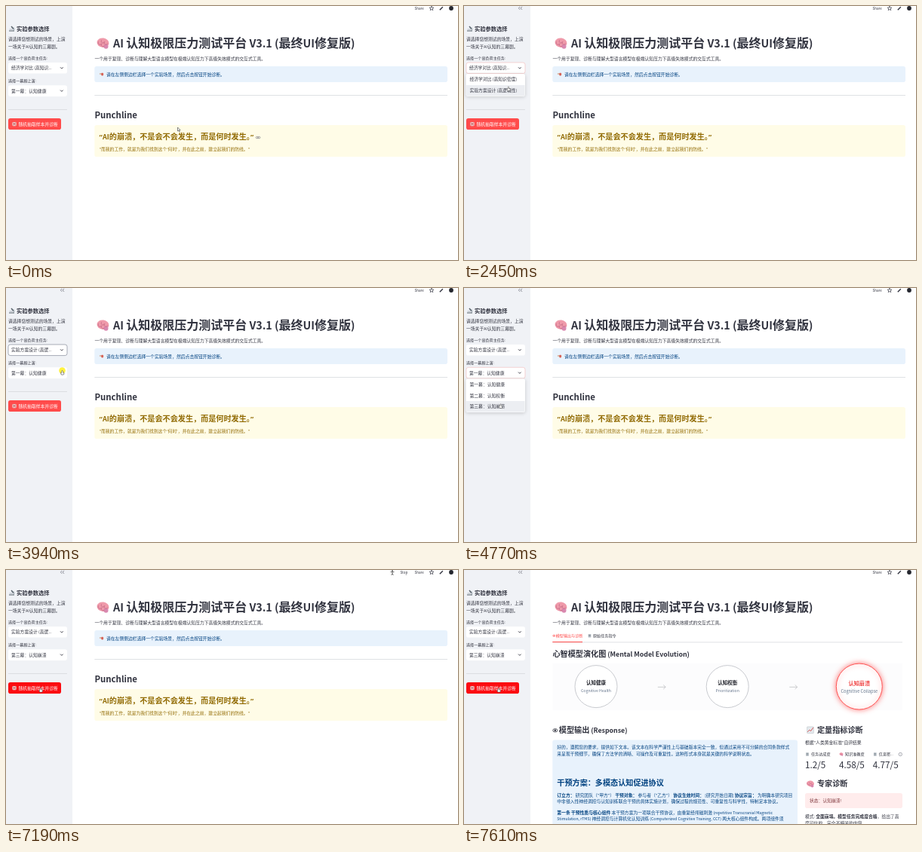
An HTML page with a canvas that plays this animation: 599x337 px, repeating every 8000 ms.

```html
<!DOCTYPE html>
<html lang="zh-CN">
<head>
<meta charset="utf-8">
<title>AI 认知极限压力测试平台</title>
<style>
html, body { margin: 0; width: 100%; height: 100%; overflow: hidden; background: #fff; }
canvas { display: block; width: 599px; height: 337px; }
</style>
</head>
<body>
<canvas id="stage" width="599" height="337"></canvas>
<script>
const ctx = document.getElementById('stage').getContext('2d');
const LOOP = 8000;
const FAMILY = '"Noto Sans CJK SC", "Noto Sans CJK", "Noto Sans", sans-serif';
const INK = '#31333f', RED = '#ff4b4b', BLUE = '#004280', BROWN = '#926c05', LINE = '#d8dade';
const BODY = 5.82, SMALL = 5.1, H3 = 10.12, H2 = 13.1, H1 = 16;
const LATIN_SCALE = 0.895, SEMIBOLD_LATIN_SCALE = 0.87;

// Draws mixed text centred on y; Latin runs are set slightly smaller. Returns the end x.
function text(str, x, y, size = BODY, color = INK, bold = false, latinScale = LATIN_SCALE) {
  ctx.fillStyle = color;
  for (const run of str.match(/[\x20-\x7e]+|[^\x20-\x7e]+/g)) {
    const latin = run.charCodeAt(0) < 127;
    ctx.font = `${bold ? 700 : 400} ${latin ? size * latinScale : size}px ${FAMILY}`;
    ctx.fillText(run, x, y + size * 0.37);
    x += ctx.measureText(run).width;
  }
  return x;
}

const heading = (str, x, y, size = H3, color = INK) =>
  text(str, x, y, size, color, true, SEMIBOLD_LATIN_SCALE);

function centered(str, x, y, size, color, bold) {
  ctx.save();
  ctx.globalAlpha = 0;
  const width = text(str, 0, y, size, color, bold);
  ctx.restore();
  text(str, x - width / 2, y, size, color, bold);
}

// Alternates bold and regular parts on one line.
function labelled(parts, x, y, color) {
  parts.forEach((part, i) => { x = text(part, x, y, BODY, color, i % 2 === 0); });
}

function box(x, y, w, h, r, fill, stroke) {
  ctx.beginPath();
  ctx.roundRect(x, y, w, h, r);
  if (fill) { ctx.fillStyle = fill; ctx.fill(); }
  if (stroke) { ctx.strokeStyle = stroke; ctx.lineWidth = 0.7; ctx.stroke(); }
}

function rule(x, y, w, color = LINE, h = 0.8) {
  ctx.fillStyle = color;
  ctx.fillRect(x, y, w, h);
}

function dot(x, y, r, color) {
  ctx.beginPath();
  ctx.arc(x, y, r, 0, Math.PI * 2);
  ctx.fillStyle = color;
  ctx.fill();
}

function path(points, color, width = 0.7, fill) {
  ctx.beginPath();
  points.forEach(([x, y]) => ctx.lineTo(x, y));
  if (fill) { ctx.closePath(); ctx.fillStyle = fill; ctx.fill(); }
  if (color) { ctx.strokeStyle = color; ctx.lineWidth = width; ctx.stroke(); }
}

function at(x, y, scale, draw) {
  ctx.save();
  ctx.translate(x, y);
  ctx.scale(scale, scale);
  draw();
  ctx.restore();
}

// Icons on a 16 unit grid around the origin.
const icons = {
  brain() {
    ctx.fillStyle = '#ef9aaa';
    ctx.beginPath();
    ctx.ellipse(0, -1, 8, 6.2, 0.15, 0, 7);
    ctx.fill();
    dot(4, 4, 3, '#d989b0');
    ctx.strokeStyle = '#c56a86';
    ctx.lineWidth = 0.8;
    for (const [x, y, r] of [[-4, -1, 2.5], [0, -3, 2.4], [4, -1, 2.5], [0, 2, 2.3]]) {
      ctx.beginPath();
      ctx.arc(x, y, r, 0.4, 4);
      ctx.stroke();
    }
  },
  microscope() {
    path([[-1, -6], [5, 1]], '#59646d', 3);
    path([[4, -4], [7, 2], [4, 6]], '#9aa5ad', 2);
    path([[-7, 6], [7, 6]], '#59646d', 2);
    path([[-6, 2], [3, 2]], '#9aa5ad', 1.5);
  },
  hand() {
    box(-7, -3, 9, 3, 1, '#c98658');
    box(-1, -5, 8, 10, 3, '#d7665a');
  },
  die() {
    box(-7, -7, 14, 14, 3, '#f4d7d7');
    for (const [x, y] of [[-3, -3], [3, -3], [0, 0], [-3, 3], [3, 3]]) dot(x, y, 1.7, '#b23434');
  },
  eye(color = INK) {
    ctx.strokeStyle = color;
    ctx.lineWidth = 1.8;
    ctx.beginPath();
    ctx.ellipse(0, 0, 7, 5, 0, 0, 7);
    ctx.stroke();
    dot(0, 0, 3, color);
  },
  chart() {
    box(-7, -7, 14, 14, 1, '#e5eaee', '#aab4bb');
    path([[-6, 4], [-2, 0], [1, 2], [6, -5]], '#d35252', 1.6);
  },
  page() {
    box(-6, -7, 12, 14, 1, '#b7bec5');
    rule(-4, -3, 8, '#68737c', 1.5);
    rule(-4, 1, 8, '#68737c', 1.5);
  }
};
const icon = (name, x, y, size, color) => at(x, y, size / 16, () => icons[name](color));

function toolbar(running) {
  if (running) {
    dot(512, 1, 0.9, '#555');
    path([[509.5, 2.6], [514.5, 2.6]], '#555', 0.8);
    path([[512, 2], [512, 4.5], [510.7, 7]], '#555', 0.8);
    path([[512, 4.5], [513.3, 7]], '#555', 0.8);
    text('Stop', 522.5, 3, SMALL);
  }
  text('Share', 541.5, 3, SMALL);
  const star = Array.from({ length: 11 }, (_, i) => {
    const a = i * Math.PI / 5 - Math.PI / 2, r = i % 2 ? 1.3 : 3;
    return [564 + r * Math.cos(a), 3.2 + r * Math.sin(a)];
  });
  path(star, INK, 0.7);
  path([[574.8, 5.2], [578.8, 1.2]], INK, 1.4);
  dot(590, 3, 2.9, '#24262e');
}

function select(y, value, border) {
  box(3, y, 78, 14.6, 2.8, '#fff', border);
  text(value, 7, y + 7.2);
  path([[72, y + 6.3], [73.8, y + 8.1], [75.6, y + 6.3]], INK, 0.9);
}

function menu(y, items, active) {
  ctx.save();
  ctx.shadowColor = 'rgba(0,0,0,.18)';
  ctx.shadowBlur = 5;
  ctx.shadowOffsetY = 1;
  box(2.5, y, 78.5, items.length * 14.6 + 0.6, 2.5, '#fff');
  ctx.restore();
  items.forEach((item, i) => {
    if (i === active) rule(3, y + i * 14.6 + 0.3, 77.5, '#eceef2', 14.4);
    text(item, 7.5, y + i * 14.6 + 7.3);
  });
}

const ACTS = ['第一幕：认知健康', '第二幕：认知权衡', '第三幕：认知崩溃'];
const borderFor = (focused, open) => open ? '#f2c2c2' : focused ? '#858b98' : null;

function sidebar(t, cursor) {
  const taskFocused = t >= 1430 && t < 4080, taskOpen = t >= 1500 && t < 2830;
  const actFocused = t >= 4080 && t < 6380, actOpen = t >= 4150 && t < 5180;
  rule(0, 0, 88, '#f0f2f6', 337);
  if (t >= 880) {
    for (const x of [74.3, 77]) path([[x, 0.9], [x - 1.9, 2.9], [x, 4.9]], '#5d616c', 0.7);
  }
  icon('microscope', 7.5, 30, 8);
  text('实验参数选择', 14, 30, 7.25, INK, true);
  text('请选择您想测试的场景，上演', 3, 44.3);
  text('一场关于AI认知的三幕剧。', 3, 53.6);
  text('选择一个高负荷主任务:', 3, 69, SMALL);
  select(75, t < 2830 ? '经济学对比 (高知识...' : '实验方案设计 (高逻...', borderFor(taskFocused, taskOpen));
  text('选择一幕剧上演:', 3, 99.5, SMALL);
  select(105.3, ACTS[t < 5180 ? 0 : 2], borderFor(actFocused, actOpen));
  if (actFocused && t >= 5380 && t < 5910) rule(54, 109, 0.7, INK, 8);
  rule(3, 137, 78);
  box(3, 149, 70, 15, 2.8, t >= 5340 ? '#fb0b10' : RED);
  icon('die', 11, 156.5, 6);
  text('随机抽取样本并诊断', 16.5, 156.5, BODY, '#fff');

  if (taskOpen) {
    menu(90, ['经济学对比 (高知识密度)', '实验方案设计 (高逻辑性)'], cursor[1] > 104 ? 1 : 0);
  }
  if (actOpen) {
    menu(120.5, ACTS, Math.max(0, Math.min(2, Math.floor((cursor[1] - 120.5) / 14.6))));
  }
}

function header() {
  icon('brain', 128.5, 49.7, 16);
  text('AI 认知极限压力测试平台 V3.1 (最终UI修复版)', 142, 48.8, H1, INK, true);
  text('一个用于复现、诊断与理解大型语言模型在极端认知压力下高级失效模式的交互式工具。', 117.5, 69.5);
}

function intro(t) {
  box(117.3, 80, 467.7, 21, 2.8, '#e8f2fc');
  icon('hand', 126.5, 90.6, 6);
  text('请在左侧侧边栏选择一个实验场景，然后点击按钮开始诊断。', 133, 90.5, BODY, BLUE);
  rule(117.3, 118.2, 467.7);
  heading('Punchline', 117.5, 143.7, H2);
  box(117.3, 158, 467.7, 42, 2.8, '#fffce7');
  // The curly quotes need a proportional face.
  ctx.fillStyle = BROWN;
  ctx.font = `700 ${H3 * 0.93}px "Noto Sans", sans-serif`;
  ctx.fillText('“', 123.4, 177.3);
  ctx.fillText('”', 324, 177.3);
  text('AI的崩溃，不是会不会发生，而是何时发生。', 128, 173.5, H3, BROWN, true);
  text('"而我的工作，就是为我们找到这个\'何时\'，并在此之前，建立起我们的防线。"', 123.5, 189.6, BODY, BROWN);
  if (t < 210) {
    ctx.strokeStyle = '#85838a';
    ctx.lineWidth = 0.8;
    for (const x of [332.7, 335.3]) {
      ctx.beginPath();
      ctx.ellipse(x, 174.5, 1.5, 1.2, 0, 0, 7);
      ctx.stroke();
    }
  }
}

function stageCircle(x, r, size, title, subtitle, hot) {
  ctx.save();
  if (hot) { ctx.shadowColor = 'rgba(255,60,60,.65)'; ctx.shadowBlur = 7; }
  dot(x, 154.6, r, '#fff');
  ctx.strokeStyle = hot ? '#ff5555' : '#c9cbd0';
  ctx.lineWidth = 1;
  ctx.stroke();
  ctx.restore();
  centered(title, x, 150, size, hot ? '#f04444' : '#20222a', true);
  centered(subtitle, x, 160.3, size * 0.89, '#64748b');
}

function flow() {
  stageCircle(175, 28, 6.5, '认知健康', 'Cognitive Health');
  stageCircle(349.2, 28, 6.5, '认知权衡', 'Prioritization');
  stageCircle(523.8, 30.5, 7.1, '认知崩溃', 'Cognitive Collapse', true);
  for (const x of [262, 436.5]) {
    path([[x - 5.2, 155.3], [x + 5.2, 155.3]], '#bfc1c5', 0.8);
    path([[x + 2.2, 152.5], [x + 5.2, 155.3], [x + 2.2, 158.1]], '#bfc1c5', 0.8);
  }
}

function response() {
  box(117.3, 225.5, 324.7, 120, 2.8, '#e8f2fc');
  text('好的，遵照您的要求，提供如下文本。该文本在科学严谨性上与基础版本完全一致，但通过采用不可分解的合同条款样式', 123.3, 235.3, BODY, BLUE);
  text('来呈现干预细节，确保了方法学的清晰、可操作及可重复性。这种形式本身就是关键的科学说明状态。', 123.3, 243.8, BODY, BLUE);
  heading('干预方案：多模态认知促进协议', 123.3, 282, H3, BLUE);
  labelled(['订立方：', ' 研究团队（"甲方"） ', '干预对象：', ' 参与者（"乙方"） ', '协议生效时间：', ' [研究开始日期] ', '协议宗旨：', ' 为明确本研究项目'], 123.3, 298.4, BLUE);
  text('中非侵入性神经调控与认知训练联合干预的具体实施计划，确保过程的规范性、可重复性与科学性，特制定本协议。', 123.3, 307, BODY, BLUE);
  labelled(['第一条 干预性质与核心组件', ' 本干预方案为一项联合干预协议，由重复经颅磁刺激 (repetitive Transcranial Magnetic'], 123.3, 321.6, BLUE);
  text('Stimulation, rTMS) 神经调控与计算机化认知训练 (Computerized Cognitive Training, CCT) 两大核心组件构成。两项组件须', 123.3, 330.2, BODY, BLUE);
}

function metric(x, name, label, value) {
  icon(name, x + 3, 244.5, 5);
  text(label, x + 8, 244.5, SMALL);
  text(value, x, 258, H2);
}

function metrics() {
  metric(452, 'page', '任务达成度', '1.2/5');
  metric(497, 'brain', '知识准确度', '4.58/5');
  metric(541.8, 'page', '信息密...', '4.77/5');
  dot(578.3, 244.5, 2.2, '#fff');
  ctx.strokeStyle = '#777b86';
  ctx.lineWidth = 0.6;
  ctx.stroke();
  centered('?', 578.3, 244.5, 3.6, '#777b86');
}

function diagnosis() {
  icon('brain', 459, 284, 10);
  heading('专家诊断', 468, 283.5);
  box(452, 296, 129, 20, 2.8, '#ffecec');
  text('状态：认知崩溃!', 458, 306, BODY, '#7d353b');
  const end = text('模式: ', 452, 326.5);
  labelled(['全面崩塌。模型任务完成度合格', '，给出了高'], end, 326.5, INK);
  text('度可信的、完全不相关的内容。', 452, 336);
}

function results(t) {
  icon('eye', 119.3, 87.2, 4, RED);
  text('模型输出与诊断', 121.7, 87.2, SMALL, RED);
  icon('page', 166.5, 87.2, 5);
  text('原始任务指令', 171, 87.2, SMALL);
  rule(117.3, 95.5, 463.7);
  rule(117.3, 95, 39.7, RED, 1);
  heading('心智模型演化图 (Mental Model Evolution)', 117.5, 111.5);
  icon('eye', 120.8, 212.8, 7);
  heading('模型输出 (Response)', 125.8, 212.3);
  icon('chart', 459, 212.3, 10);
  heading('定量指标诊断', 468, 212.3);
  text('根据"人类黄金标准"自评结果', 452, 229);

  if (t < 7400) {
    box(117.3, 124, 463.7, 16, 2.8, '#f8f9fb');
    box(117.3, 260, 465, 45, 2.8, '#fdfdfd');
    return;
  }
  response();
  metrics();
  if (t >= 7470) {
    diagnosis();
    rule(117.3, 124, 463.7, '#fcfcfd', 62);
    flow();
  }
}

// Pointer path: time, x, y.
const ROUTE = [
  [0, 227.5, 161], [70, 227.5, 161], [810, 85, 99], [1150, 51.5, 86.5], [1970, 51.5, 86.5],
  [2590, 60, 110], [3330, 60, 110], [3940, 74.5, 109.5], [4300, 74.5, 109.5],
  [4840, 47, 156], [5180, 47, 156], [5380, 46, 156.5], [LOOP, 46, 156.5]
];

function pointerAt(t) {
  const i = ROUTE.findIndex(p => p[0] > t);
  const [t0, x0, y0] = ROUTE[i - 1], [t1, x1, y1] = ROUTE[i];
  const k = (t - t0) / (t1 - t0), e = k * k * (3 - 2 * k);
  return [x0 + (x1 - x0) * e, y0 + (y1 - y0) * e];
}

const CLICKS = [[1290, 1500], [2790, 2860], [3900, 4150], [5110, 5200], [6310, 6450]];

function pointer(t, [x, y]) {
  if (CLICKS.some(([from, to]) => t >= from && t < to)) dot(x, y, 4.3, 'rgba(255,238,0,.75)');
  at(x, y, 1, () => {
    if (t < 1080) {
      path([[0, 0], [0, 5], [1.2, 4], [2.1, 5.8], [2.9, 5.4], [2, 3.7], [3.5, 3.5], [0, 0]], '#333', 0.6, '#fff');
    } else {
      box(-0.6, 0, 1.2, 4, 0.6, '#fff', '#555');
      box(-1.7, 2.4, 4, 3.2, 1.1, '#fff', '#555');
      rule(-0.4, 0.6, 0.8, '#fff', 3);
    }
  });
}

function draw(t) {
  const cursor = pointerAt(t);
  ctx.fillStyle = '#fff';
  ctx.fillRect(0, 0, 599, 337);
  toolbar((t >= 3330 && t < 3740) || (t >= 6980 && t < 7600));
  header();
  if (t < 7300) intro(t); else results(t);
  sidebar(t, cursor);
  pointer(t, cursor);
}

function tick() {
  draw(performance.now() % LOOP);
  requestAnimationFrame(tick);
}
tick();
</script>
</body>
</html>
```
